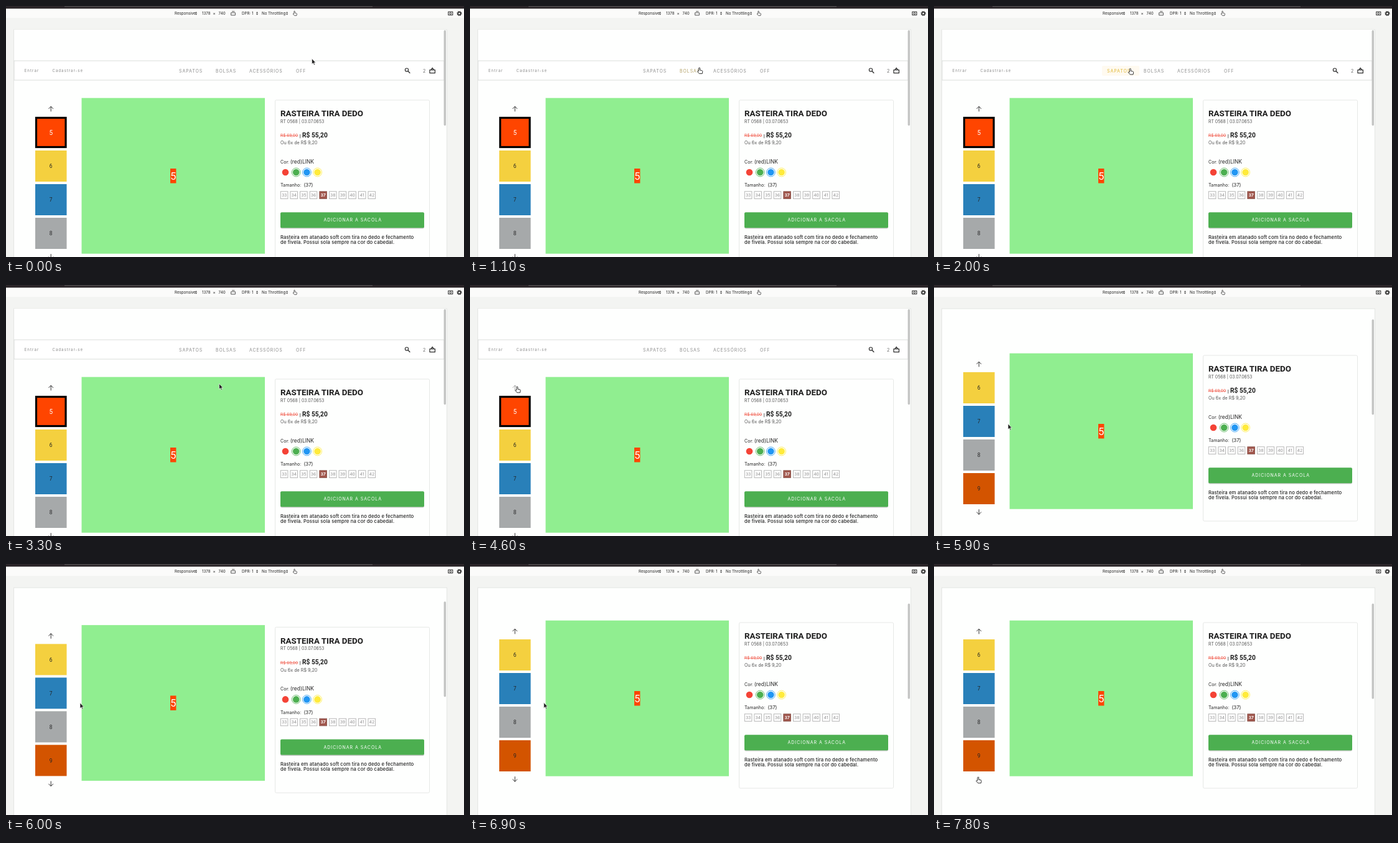
An HTML page that plays this animation: 736 by 403 pixels, repeating every 8 s.

```html
<!DOCTYPE html>
<html lang="pt">
<head>
<meta charset="utf-8">
<title>Loja</title>
<style>
  html, body { margin: 0; width: 100%; height: 100%; overflow: hidden; background: #f3f4f2; }
  svg { display: block; width: 736px; height: 403px; }
  text { font-family: Inter, "Open Sans", sans-serif; white-space: pre; }
  .roboto { font-family: Roboto, Arial, sans-serif; }
  .bold { font-weight: 700; }
  .medium { font-weight: 500; }
  .mid { text-anchor: middle; }
  .line { fill: none; stroke-linecap: round; stroke-linejoin: round; }
</style>
</head>
<body>
<svg id="stage" viewBox="0 0 736 403"></svg>
<script>
const LOOP = 8000, STEP = 100;

const text = (x, y, size, str, fill = '#222', cls = '', spacing = 0, id = '') =>
  `<text x="${x}" y="${y}" font-size="${size}" fill="${fill}" class="${cls}" letter-spacing="${spacing}"${id && ` id="${id}"`}>${str}</text>`;
const rect = (x, y, w, h, fill, extra = '') =>
  `<rect x="${x}" y="${y}" width="${w}" height="${h}" fill="${fill}" ${extra}/>`;
const line = (d, stroke = '#333', width = 1, extra = '') =>
  `<path class="line" d="${d}" stroke="${stroke}" stroke-width="${width}" ${extra}/>`;

const HAND = 'M-1.6 6V1.2a1 1 0 0 1 2 0V4.2l3.2.7q1.2.3 1 1.6L4 9.8H-.8L-3.6 6.6q-.2-1 .8-1z';
const hand = (scale, x, y) =>
  `<path d="${HAND}" transform="translate(${x} ${y}) scale(${scale})" fill="#fff" stroke="#333" stroke-width="1" stroke-linejoin="round"/>`;
const spinner = x =>
  `<path d="M${x - 1.6} 11.2l1.6-2 1.6 2zM${x - 1.6} 12.6l1.6 2 1.6-2z" fill="#333"/>`;

function browserBar() {
  const label = (x, str) => text(x, 14.1, 6.2, str, '#222');
  return rect(0, 0, 736, 4.5, '#2b2529') + rect(94, 0, 495, 1.6, '#4b4649') +
    rect(0, 4.5, 736, 14.5, '#fbfbfa') +
    label(271, 'Responsive') + spinner(305.5) +
    label(315, '1378') + label(332.5, '×') + label(341.5, '740') +
    line('M362 10.8h6.4v4h-6.4zM363.5 8.7h3.5', '#444', .9) +
    label(379, 'DPR: 1') + spinner(403.5) +
    label(411, 'No Throttling') + spinner(451.5) +
    hand(.75, 464, 8) +
    line('M710.8 9.3h7v5.2h-7z', '#333', 1.1) +
    '<circle cx="714.3" cy="11.9" r="1.4" fill="none" stroke="#333"/>' +
    '<circle cx="728.5" cy="12" r="2.3" fill="none" stroke="#222" stroke-width="1.5"/>' +
    '<circle cx="728.5" cy="12" r="3.5" fill="none" stroke="#222" stroke-width="1.2" stroke-dasharray="1.3 1.45"/>';
}

function header() {
  const link = (x, str, id) => text(x, 106.5, 6.9, str, '#8b8b8b', '', 1, id);
  return rect(13, 38, 691, 81, '#fefffe') +
    rect(13, 88, 691, 31, '#fff', 'stroke="#dcdedc"') +
    rect(270, 96, 60, 16, '#fffaf0', 'id="glow" rx="2"') +
    text(29.5, 106.2, 6.1, 'Entrar', '#8b8b8b', '', 1.1) +
    text(74.5, 106.2, 6.1, 'Cadastrar-se', '#8b8b8b', '', 1) +
    link(278, 'SAPATOS', 'sapatos') + link(337, 'BOLSAS', 'bolsas') +
    link(391, 'ACESSÓRIOS', '') + link(466, 'OFF', '') +
    '<circle cx="644" cy="102.6" r="2.6" fill="none" stroke="#333" stroke-width="1.2"/>' +
    line('M646.2 104.8l2.7 2.7', '#333', 1.4) +
    text(670, 106.6, 7, '2', '#666') +
    line('M681 102.7h8.4v5h-8.4zM683 102.5l2.2-3 2.2 3', '#333', 1.3);
}

function gallery() {
  const swatches = [[5, '#ff4500'], [6, '#f4d03f'], [7, '#2980b9'], [8, '#a6a9aa'], [9, '#d35400']];
  const tile = ([n, color], i) => {
    const y = 178 + 54 * i;
    return i
      ? rect(47, y, 50.5, 50, color) + text(72.2, y + 28.2, 8.3, n, '#222', 'roboto mid')
      : rect(48.5, y + 1.5, 47.5, 47, color, 'stroke="#000" stroke-width="3.2"') +
        text(72.2, y + 28.6, 10, n, '#fff', 'roboto mid');
  };
  return line('M72.2 169V161.4M68.7 164.8l3.5-3.5 3.5 3.5', '#333', 1, 'id="up"') +
    `<g clip-path="url(#strip)"><g id="tiles">${swatches.map(tile).join('')}</g></g>` +
    line('M72.2 398.6V406.2M68.7 402.8l3.5 3.5 3.5-3.5', '#333', 1, 'id="down"') +
    rect(121.5, 147.7, 294.5, 250, '#90ee90') +
    rect(264, 261, 9.4, 23.5, '#ff4500') + text(268.7, 278.6, 16.5, 5, '#fff', 'roboto mid');
}

function details() {
  const dot = (color, i) => {
    const c = `cx="${449 + 17.2 * i}" cy="267"`;
    return `<circle ${c} r="5.3" fill="${color}"/>` +
      (i ? `<circle ${c} r="6.9" fill="none" stroke="${color}" stroke-width=".8"/>` : '');
  };
  const size = (_, i) => {
    const x = 441.3 + 15.63 * i, on = i === 4;
    return rect(x, 297.8, 11.6, 11.6, on ? '#a0564c' : '#fff', `stroke="${on ? '#8d5a52' : '#b0b0b0'}" stroke-width=".9"`) +
      text(x + 5.8, 306, 6.8, 33 + i, on ? '#fff' : '#8f8f8f', on ? 'mid bold' : 'mid');
  };
  return rect(432.5, 151, 248, 266, '#fefffe', 'rx="2" stroke="#e6e8e6"') +
    text(441, 177.3, 13.35, 'RASTEIRA TIRA DEDO', '#1c1c1c', 'roboto bold') +
    text(441, 188, 6.9, 'RT 0568 | 03.07.0653', '#555') +
    text(441, 210.4, 6.5, 'R$ 69,00', '#f05545') + line('M441 208.2H469', '#f05545', .7) +
    text(471.8, 210.6, 8, '|', '#222', 'roboto bold') +
    text(476, 210.7, 10.2, 'R$ 55,20', '#1c1c1c', 'roboto bold') +
    text(441, 222.2, 7.2, 'Ou 6x de R$ 9,20', '#555') +
    text(441, 252.5, 7.1, 'Cor:') + text(456.8, 252.5, 8.4, '(red)LINK') +
    ['#f44336', '#4caf50', '#2196f3', '#ffeb3b'].map(dot).join('') +
    text(441, 290.4, 7.2, 'Tamanho:') + text(478.4, 290.4, 7.9, '(37)') +
    Array.from({ length: 10 }, size).join('') +
    rect(441, 332.3, 231, 25.2, '#000', 'rx="2" opacity=".2"') +
    rect(441, 331.2, 231, 25, '#4caf50', 'rx="2"') +
    text(510.5, 346.2, 7, 'ADICIONAR A SACOLA', '#fff', '', .98) +
    text(441, 374, 7.7, 'Rasteira em atanado soft com tira no dedo e fechamento', '#222', 'medium', .13) +
    text(441, 382, 7.7, 'de fivela. Possui sola sempre na cor do cabedal.', '#222', 'medium', .13);
}

const stage = document.getElementById('stage');
stage.innerHTML = `
  <defs>
    <clipPath id="view"><rect x="12" y="38" width="697" height="365"/></clipPath>
    <clipPath id="strip"><rect x="46" y="176.5" width="53" height="214"/></clipPath>
  </defs>
  ${rect(0, 0, 736, 403, '#f3f4f2')}
  ${browserBar()}
  ${rect(12.5, 38, 696, 370, '#fefffe', 'stroke="#e4e6e4"')}
  <g clip-path="url(#view)">
    <g id="page">${gallery()}${details()}</g>
    <g id="header">${header()}</g>
    ${rect(703.6, 39, 3.4, 153, '#c3c4c3', 'id="thumb" rx="1.5"')}
  </g>
  <g id="status">${rect(0, 391, 146, 12, '#f0f0f0', 'stroke="#c8c8c8" stroke-width=".7"')}
    ${text(3, 399.4, 6.4, 'https://localhost:3000/categoria/sapatos', '#333')}</g>
  <g id="cursor">
    <path id="arrow" d="M0 0V8.8L2.1 7 3.6 10.2 5 9.5 3.5 6.5H6.2z" fill="#222" stroke="#fff" stroke-width=".6"/>
    <g id="hand">${hand(1, 0, 0)}</g>
  </g>`;

const el = Object.fromEntries([...stage.querySelectorAll('[id]')].map(e => [e.id, e]));

// Each track is a list of [time, value...] stops, joined linearly.
const tracks = {
  cursor: [[300, 491.5, 84.5], [700, 438, 90], [1200, 352, 101], [1600, 322, 101], [2000, 316, 100.2],
    [2600, 316, 100.2], [3300, 342.5, 158.5], [3900, 342.5, 158.5], [4400, 73, 159], [4500, 73, 159],
    [4600, 76.5, 163], [4700, 75, 166], [4800, 75, 166], [4900, 73, 168.5], [5500, 73, 168.5],
    [5900, 119, 223], [6800, 119, 223], [6900, 118.6, 222.6], [7100, 118.6, 222.6], [7800, 71.5, 342]],
  scroll: [[5600, 0], [5700, 9], [5800, 23], [5900, 38], [6000, 49.6], [6100, 57]],
  header: [[5600, 0], [5900, 85]],
  slide: [[4800, 0], [4900, 11], [5000, 31], [5100, 48], [5200, 54]],
  sapatos: [[1500, 0], [1900, 1], [2600, 1], [3000, 0]],
  bolsas: [[1000, 0], [1200, .9], [1500, 0]],
  up: [[4300, 1], [4600, .4], [5500, .4], [5800, 1]],
  down: [[7700, 1], [7800, .2]]
};

function at(stops, t) {
  const i = stops.findIndex(s => s[0] > t);
  if (i === 0) return stops[0].slice(1);
  if (i < 0) return stops[stops.length - 1].slice(1);
  const a = stops[i - 1], b = stops[i], k = (t - a[0]) / (b[0] - a[0]);
  return a.slice(1).map((v, n) => v + (b[n + 1] - v) * k);
}

const mix = (a, b, k) => `rgb(${a.map((v, i) => Math.round(v + (b[i] - v) * k))})`;
const linkColor = k => mix([139, 139, 139], [224, 182, 48], k);
const move = (e, x, y) => e.setAttribute('transform', `translate(${x} ${y})`);
const show = (e, on) => e.setAttribute('visibility', on ? 'visible' : 'hidden');

// Clickable areas as [left, top, right, bottom].
const hotspots = [[270, 96, 325, 112], [333, 96, 375, 112], [64, 157, 80, 173], [64, 340, 80, 353]];

function render(time) {
  const t = Math.floor(time / STEP) * STEP;
  const get = name => at(tracks[name], t)[0];
  const [x, y] = at(tracks.cursor, t), scroll = get('scroll');
  const over = hotspots.some(([l, top, r, b]) => x >= l && x <= r && y >= top && y <= b);
  move(el.page, 0, -scroll);
  move(el.header, 0, -get('header'));
  move(el.thumb, 0, scroll * .43);
  move(el.tiles, 0, -get('slide'));
  move(el.cursor, x, y);
  show(el.hand, over);
  show(el.arrow, !over);
  show(el.status, t >= 2200 && t < 2700);
  el.sapatos.setAttribute('fill', linkColor(get('sapatos')));
  el.bolsas.setAttribute('fill', linkColor(get('bolsas')));
  el.glow.setAttribute('opacity', get('sapatos'));
  el.up.setAttribute('opacity', get('up'));
  el.down.setAttribute('opacity', get('down'));
}

const start = performance.now();
function tick() {
  render((performance.now() - start) % LOOP);
  requestAnimationFrame(tick);
}
tick();
</script>
</body>
</html>
```
